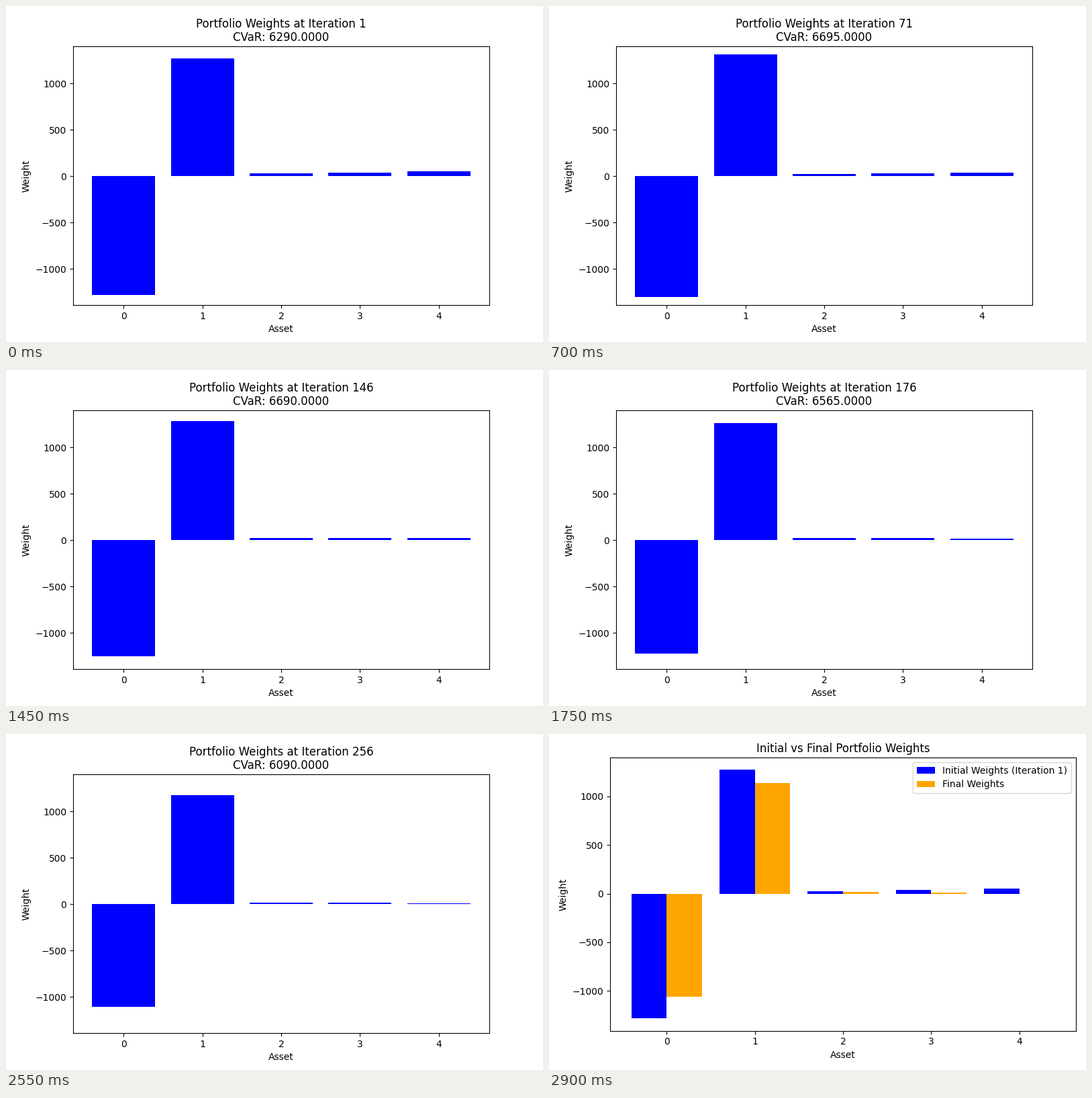
These frames come from a looping animation (800 px wide and 500 px high, 3950 ms). A matplotlib script:

```python
import matplotlib.pyplot as plt
import numpy as np
from matplotlib.animation import FuncAnimation

INTERVAL = 50
STEPS = 58          # bar chart steps, one every five iterations
FRAMES = 79         # the comparison chart holds to the end of the loop
BUDGET = 105        # the weights always add up to this

# Key steps of the search, with the size of the short position and the risk
KEYS = [0, 14, 20, 29, 42, 57]
SHORT = [1284, 1306, 1307, 1256, 1182, 1062]
RISK = [6290, 6695, 6790, 6690, 6420, 5870]

assets = np.arange(5)


def weights(step):
    """The small holdings shrink steadily; asset 1 balances the budget."""
    done = step / (STEPS - 1)
    short = -np.interp(step, KEYS, SHORT)
    small = np.array([28 - 10 * done, 38 - 24 * done, 50 - 50 * done])
    return np.array([short, BUDGET - short - small.sum(), *small])


def risk(step):
    return 5 * round(np.interp(step, KEYS, RISK) / 5)


def label_axes(ax):
    ax.set_xlabel("Asset")
    ax.set_ylabel("Weight")


fig = plt.figure(figsize=(8, 5), dpi=100)

# Closing comparison chart
final_ax = fig.add_subplot()
final_ax.bar(assets - 0.2, weights(0), 0.4, color="blue",
             label="Initial Weights (Iteration 1)")
final_ax.bar(assets + 0.2, weights(STEPS - 1), 0.4, color="orange",
             label="Final Weights")
final_ax.set_title("Initial vs Final Portfolio Weights")
final_ax.legend(loc="upper right")
label_axes(final_ax)
fig.tight_layout()
fig.subplots_adjust(top=0.93)

# Chart of the running optimisation
step_ax = fig.add_axes([0.125, 0.11, 0.775, 0.77])
bars = step_ax.bar(assets, weights(0), color="blue")
step_ax.set_ylim(-1325 * 1.05, 1335 * 1.05)
label_axes(step_ax)


def update(frame):
    running = frame < STEPS
    step_ax.set_visible(running)
    final_ax.set_visible(not running)
    if running:
        for bar, weight in zip(bars, weights(frame)):
            bar.set_height(weight)
        step_ax.set_title(f"Portfolio Weights at Iteration {1 + 5 * frame}\n"
                          f"CVaR: {risk(frame):.4f}", linespacing=1.1)
    return []


anim = FuncAnimation(fig, update, frames=FRAMES, interval=INTERVAL,
                     init_func=lambda: update(0), repeat=True)
plt.show()
```
